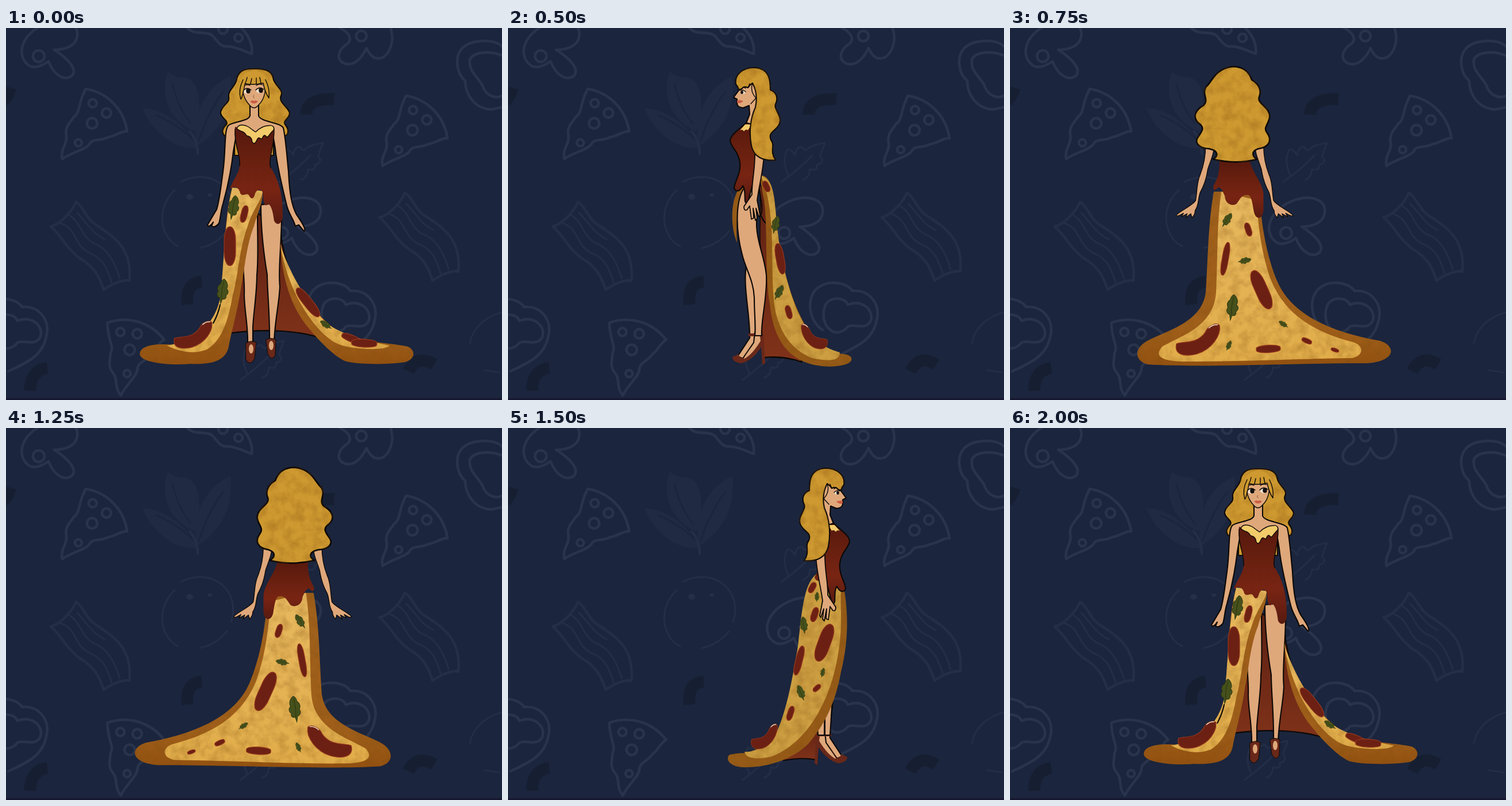
Recreate the animation shown at these times as an HTML page. Size 864 px wide and 648 px high, loop 2.25 s.

```html
<!DOCTYPE html>
<html lang="en">
<head>
<meta charset="utf-8">
<title>Pizza gown turn</title>
<style>
html, body { margin: 0; width: 100%; height: 100%; overflow: hidden; background: #1b253d; }
svg { display: block; width: 100vw; height: 100vh; }
.doodle { fill: none; stroke: #29344c; stroke-width: 4.6; stroke-linecap: round; stroke-linejoin: round; }
.thin { stroke-width: 3; }
.faint { opacity: .65; }
.olive { fill: none; stroke: #161f32; stroke-width: 21; }
.ink { stroke: #0b0806; stroke-width: 2.1; stroke-linejoin: round; stroke-linecap: round; }
.fine { stroke-width: 1.4; }
.line { fill: none; }
.hair { fill: #ce9930; }
.skin { fill: #dfa87b; }
.sauce { fill: url(#sauce); }
.lining { fill: url(#lining); }
.crust { fill: url(#crust); }
.cheese { fill: url(#cheese); }
.dim .cheese { fill: #cd9f42; }
.dim .crust { fill: #965b17; }
.top { fill: #f2cb6b; }
.pep { fill: #6c2013; stroke: #96381d; stroke-width: 1.2; }
.leaf { fill: #46501b; stroke: #2c3711; stroke-width: .8; }
.shoe { fill: #692819; }
.tx { filter: url(#grain); }
</style>
</head>
<body>
<svg viewBox="0 0 864 648" preserveAspectRatio="none">
  <defs>
    <linearGradient id="sauce" x2="0" y2="1">
      <stop offset="0" stop-color="#56180e"/><stop offset=".35" stop-color="#69200f"/><stop offset=".65" stop-color="#782413"/><stop offset="1" stop-color="#581a10"/>
    </linearGradient>
    <linearGradient id="lining" x2="0" y2="1">
      <stop offset="0" stop-color="#5c2013"/><stop offset="1" stop-color="#803219"/>
    </linearGradient>
    <linearGradient id="crust" x2="0" y2="1">
      <stop offset="0" stop-color="#a0611c"/><stop offset=".8" stop-color="#9f5f1a"/><stop offset="1" stop-color="#935110"/>
    </linearGradient>
    <linearGradient id="cheese" x2="0" y2="1">
      <stop offset="0" stop-color="#e8b960"/><stop offset="1" stop-color="#e1ad4a"/>
    </linearGradient>
    <filter id="grain" color-interpolation-filters="sRGB">
      <feTurbulence type="fractalNoise" baseFrequency=".06" numOctaves="4" seed="4"/>
      <feColorMatrix values="0 0 0 0 .5  0 0 0 0 .3  0 0 0 0 .06  .6 0 0 0 -.22"/>
      <feComposite in2="SourceGraphic" operator="in" result="n"/>
      <feMerge><feMergeNode in="SourceGraphic"/><feMergeNode in="n"/></feMerge>
    </filter>
  </defs>
  <rect width="864" height="648" fill="#1b253d"/>
  <g id="wall"></g>
  <rect y="645" width="864" height="3" fill="#171730"/>
  <g id="cast"></g>
</svg>
<script>
const path = (cls, d, extra = '') => `<path class="${cls}" d="${d}" ${extra}/>`;
const group = (t, ...parts) => `<g transform="${t}">${parts.join('')}</g>`;
const wrap = (cls, ...parts) => `<g class="${cls}">${parts.join('')}</g>`;
const tx = (...parts) => wrap('tx', ...parts);
const ring = (x, y, r) => `<circle class="doodle" cx="${x}" cy="${y}" r="${r}"/>`;
const dot = (x, y, rx, ry, fill) => `<ellipse cx="${x}" cy="${y}" rx="${rx}" ry="${ry}" fill="${fill}"/>`;
const pep = (x, y, rx, ry, a) =>
  `<rect class="pep" x="${-rx}" y="${-ry}" width="${2 * rx}" height="${2 * ry}" rx="${rx * .95}" ry="${ry * .7}" transform="translate(${x} ${y}) rotate(${a})"/>`;
const leaf = (x, y, s, a) => group(`translate(${x} ${y}) rotate(${a}) scale(${s * .8} ${s})`,
  path('leaf', 'M1-15C7-12 9-6 6-3C11-1 9 4 6 5C8 9 4 11 1 10L-1 16L-3 9C-8 8-9 3-6 1C-10-3-6-8-4-8Q-3-13 1-15Z'),
  path('line', 'M1-12Q-2 0 0 10', 'stroke="#2c3711"'));
const bean = (t = '') => group(t,
  path('pep', 'M290 550C300 545 325 552 340 530C345 518 360 512 365 518C368 535 352 560 325 568C305 573 285 570 290 550Z'),
  path('line', 'M346 523Q353 516 362 517', 'stroke="#e8d6ba" stroke-width="1.6"'));

/* ---------- wallpaper ---------- */
const shroom = path('doodle', 'M467 375C440 360 448 320 490 302C520 288 552 298 548 322C546 340 526 346 508 346C530 360 548 378 540 390C528 402 508 392 498 366C490 372 478 378 467 375') + ring(481, 357, 10);
const slice = path('doodle', 'M139 106C175 112 205 140 211 180C200 179 188 190 178 190C165 198 150 191 145 203C135 214 115 216 98 228C94 210 108 202 105 187C102 172 112 165 118 155C130 148 125 130 139 106Z') +
  ring(151, 131, 7) + ring(175, 148, 8) + ring(150, 166, 9) + ring(126, 200, 6);
const bacon = wrap('faint',
  path('doodle', 'M78 346C92 342 112 325 122 303C135 310 140 335 160 345C190 365 220 385 215 440C205 438 185 445 170 456C162 430 152 415 130 402C105 385 100 365 78 346Z'),
  path('doodle thin', 'M95 340C125 350 118 382 150 394C172 404 178 425 184 443M110 326C132 338 130 368 160 378C182 390 192 415 198 436M124 322C142 340 150 358 172 368'));
const pepper = path('doodle', 'M548 526C522 508 520 470 538 454C556 438 590 442 600 458C630 455 650 482 642 510C635 545 605 556 576 570') +
  path('doodle', 'M556 478C570 466 588 472 592 482C615 472 638 490 632 510C622 528 604 514 592 520C585 530 570 534 562 526C545 515 548 486 556 478Z');
const sprig = wrap('faint', path('doodle thin', 'M476 268Q505 248 530 222M488 256C478 236 482 222 486 212C494 210 498 218 500 222C502 210 506 207 512 207C516 212 518 214 520 212C530 203 544 202 552 200C548 212 544 218 544 225C552 230 544 238 538 238C540 248 532 248 526 246C526 258 518 264 514 264'));
const basil = wrap('faint',
  ...['M334 208C300 215 255 185 238 140C270 140 312 165 334 208Z', 'M334 205C320 170 340 105 391 84C396 130 380 175 334 205Z',
    'M328 180C280 160 268 110 282 76C300 92 310 80 324 92C340 110 340 150 328 180Z'].map(d => path('', d, 'fill="#242f47"')),
  path('doodle thin', 'M334 219Q334 195 318 178M262 152Q300 168 332 200M378 112Q350 150 336 196M290 98Q300 140 322 166', 'style="stroke:#1b253d"'),
  path('doodle', 'M334 219Q333 195 320 180'));

document.getElementById('wall').innerHTML = [
  shroom, group('translate(-424 -308)', shroom),
  path('doodle', 'M582 0C598 8 604 20 594 28C578 38 574 56 590 62C608 68 622 48 628 35C640 62 660 55 668 38C676 20 672 8 670 0'), ring(619, 14, 9),
  slice, group('translate(558 12)', slice), group('translate(200 640) rotate(-29) translate(-98 -228)', slice),
  path('doodle', 'M316 0C330 14 345 4 358 12C368 20 372 34 386 32C400 32 414 40 428 45C430 28 422 12 410 0'), ring(405, 17, 7), ring(378, 2, 8),
  bacon, group('translate(573 -16)', bacon),
  pepper, group('translate(-572 28)', pepper),
  path('doodle', 'M864 32C850 18 810 20 795 35C780 50 785 80 800 92C800 115 815 140 845 142L864 138M864 48C845 40 815 40 808 55C805 75 822 85 830 100C834 115 850 125 864 118'),
  wrap('faint', path('doodle thin', 'M294 282C255 320 275 370 300 380M304 268C360 240 410 285 392 338M385 354Q365 378 338 383'),
    dot(320, 294, 6, 5, '#2a354e'), dot(355, 291, 4, 3, '#2a354e'),
    path('doodle thin', 'M808 550Q815 510 864 495M834 596L860 600')),
  sprig, group('translate(-68 345)', sprig), basil,
  path('olive', 'M523 151Q524 122 572 124M341 442Q312 444 316 482M72 592Q42 596 42 632M701 598Q715 568 746 586M-5 128Q4 118 8 104')
].join('');

/* ---------- front views; turn shifts the facial features ---------- */
function front(turn) {
  const eye = (x, y) => dot(x, y, 6.2, 4.4, '#f4e6d4') + dot(x + 2 + turn / 4, y - .3, 3.8, 4.2, '#15100d') +
    path('ink line fine', `M${x - 7} ${y - 1}Q${x} ${y - 8} ${x + 7} ${y - 2}M${x - 6} ${y - 9}Q${x} ${y - 13} ${x + 5} ${y - 10}`);
  return [
    tx(path('ink hair', 'M432 71C455 71 464 76 466 90C470 102 484 108 479 118C474 130 492 138 494 148C494 158 482 160 486 168C493 176 492 184 488 187L466 190V222H398V190L380 187C374 180 380 172 384 168C388 160 372 156 374 146C378 132 390 132 388 120C386 108 402 100 402 88C406 74 415 71 432 71Z')),
    path('ink lining', 'M436 322L478 345C480 400 505 470 560 545C520 526 450 523 386 532L412 400Z'),
    path('skin ink', 'M438 318C438 370 440 400 437 430C437 460 432 490 430 520L430 550H421C422 520 415 490 415 465C416 440 412 420 413 395C414 370 424 340 438 318Z'),
    path('skin ink', 'M444 308C444 360 450 400 455 430C455 460 460 500 459 548H467C468 510 476 480 477 450C474 420 479 390 480 335L470 305Z'),
    path('shoe ink', 'M418 549Q427 543 436 548L433 576Q425 590 418 578Z', 'style="stroke-width:1"'), dot(427, 559, 4, 8, '#dfa87b'),
    path('shoe ink', 'M453 543Q462 538 470 543L469 570Q463 582 456 568Z', 'style="stroke-width:1"'), dot(462, 553, 4, 8, '#dfa87b'),
    tx(path('crust', 'M394 278L447 284C448 305 438 322 432 345C418 380 416 420 409 455C402 500 392 530 388 555C382 584 350 586 320 585C290 588 232 584 233 567C235 550 270 550 292 552C340 545 372 515 376 470C380 400 380 330 394 278Z'),
      path('cheese', 'M394 278L447 284C446 300 430 315 421 345C406 385 405 430 394 470C386 515 374 545 350 560C330 568 306 566 280 553C340 545 368 505 374 465C380 400 382 330 394 278Z'),
      path('crust', 'M478 375C490 430 540 510 590 535C620 548 670 548 700 555C715 562 712 578 695 582C660 587 610 586 590 580C570 570 545 545 525 520C500 490 480 440 478 375Z'),
      path('cheese', 'M478 377C490 420 530 490 560 515C585 535 640 548 668 553C665 562 605 561 580 551C540 535 490 460 478 377Z')),
    path('ink line', 'M373 482Q369 500 361 514'),
    pep(390, 380, 10, 34, 0), pep(415, 324, 5.5, 15, 14), bean('translate(41 62) scale(.87)'),
    pep(526, 478, 8, 31, -38), pep(602, 541, 18, 6, 22), pep(624, 549, 22, 7, 3),
    leaf(396, 312, 1.35, 8), leaf(377, 458, 1.4, 5), leaf(557, 517, .75, -60),
    path('skin ink', 'M425 132V153C422 163 394 163 387 170C380 178 383 215 378 250C374 280 372 300 367 316L351 343Q353 349 361 338L358 345Q364 349 371 340C374 330 374 318 378 306C384 285 392 250 396 215L400 192H466L469 210C472 240 482 280 488 305C492 325 500 330 504 345L510 343L519 354C524 352 515 338 506 325C498 310 494 290 492 250C489 220 487 190 483 174C478 164 444 164 440 153V132Z'),
    path('sauce', 'M399 172C397 205 409 220 407 240C405 256 394 266 390 281C398 272 407 280 408 288C413 295 418 286 423 291C427 300 432 298 434 288C438 280 446 279 448 290C448 310 454 312 456 306C462 308 465 320 467 336C472 345 480 342 482 330C483 290 474 262 461 243C456 230 468 205 467 172L435 183Z'),
    path('ink line fine', 'M399 176C397 205 409 220 407 240M467 176C468 205 456 230 461 243'),
    path('top ink fine', 'M402 175C405 167 415 168 422 172C428 176 432 180 435 181C440 176 448 170 458 170C466 168 468 175 466 178C460 182 458 190 454 190C450 184 448 188 446 193C442 193 440 188 437 195C434 203 429 203 428 194C424 186 420 190 418 186C414 178 408 182 402 175Z'),
    path('skin ink fine', 'M411 92C411 115 416 125 424 134Q432 144 440 134C449 126 453 112 452 92Z'),
    group(`translate(${turn} 0)`, eye(420, 110), eye(442, 109),
      path('line', 'M432 117Q429 121 433 122', 'stroke="#9a6440" stroke-width="1.2"'),
      path('', 'M425 128Q429 125 432 127Q436 125 439 128Q432 135 425 128Z', 'fill="#cb5b45"')),
    path('hair', 'M409 124C403 96 408 76 432 74C456 76 462 98 458 122C452 116 451 106 448 96Q432 99 417 98Q413 108 409 124Z'),
    path('ink line fine', 'M409 124Q404 108 413 90M410 123Q414 112 416 98Q419 92 420 86M417 97Q430 100 448 96M426 97L428 88M436 97V87M444 96L442 86M448 96Q451 112 458 122Q460 106 452 90')
  ].join('');
}

/* ---------- profile parts, facing left ---------- */
const feet = [
  path('skin ink', 'M415 415C409 450 422 500 421 540L400 572L410 576L431 545L430 440Z'),
  path('skin ink', 'M430 530L428 548L408 577L416 578L442 552V530Z'),
  path('shoe', 'M419 532H445L448 584L443 587L441 556Q425 580 406 584Q391 582 391 573L402 568Q402 575 410 575L424 552L410 577Q425 570 440 545L439 537H419Z')
].join('');
const thigh = path('skin ink', 'M412 278C396 300 396 350 408 395C414 420 428 440 429 470C429 500 432 520 430 536H442C440 510 452 470 450 430C446 395 434 375 433 345V285Z');
const bust = [
  path('skin ink', 'M404 98L401 110L393 121L399 124V130Q398 138 410 139L420 135L421 150L414 168L440 180L440 110L426 95Z'),
  path('sauce ink', 'M415 165C405 175 388 185 387 196C388 208 402 215 404 235C406 255 394 268 394 279C397 287 405 284 409 275C414 280 412 294 413 302Q416 309 419 300L424 280L440 225L432 170Z'),
  path('top', 'M413 168Q408 174 404 178Q409 176 411 180Q414 175 418 178L424 168Z'),
  path('skin ink', 'M430 215C431 245 424 270 425 290L411 311Q411 319 416 317L421 310L424 333L428 331L427 314L431 335L434 332L432 314L437 329L439 326L434 300C437 275 446 245 446 215Z', 'style="stroke-width:1.8"'),
  dot(409, 112, 4, 3, '#f4e6d4'), dot(407.5, 112, 2.4, 3, '#15100d'),
  path('ink line fine', 'M403 109Q408 106 414 111M404 105Q409 101 414 105'),
  path('', 'M399 126Q404 125 410 127Q404 133 399 130Z', 'fill="#cb5b45"'),
  tx(path('hair ink', 'M397 98C394 82 408 69 430 69C455 71 457 90 457 108C468 112 470 122 467 130C460 140 478 152 473 166C468 180 452 180 458 195C466 205 455 214 466 230C445 232 428 225 424 205C420 185 421 160 431 138Q436 115 426 96Q421 99 418 104Q414 102 410 103Q406 108 402 107Q401 103 397 98Z')),
  path('ink line fine', 'M426 96Q421 110 432 122L423 132M418 104L421 97')
].join('');

const sideLeft = wrap('dim',
  path('lining ink fine', 'M434 265C448 300 430 360 446 420C448 470 436 520 446 574Q480 572 512 582L470 500L455 300Z'),
  path('ink line', 'M446 574Q480 570 512 582M437 280Q446 320 440 325Q446 340 451 340'),
  tx(path('crust', 'M404 277C387 300 387 345 399 374C396 335 400 305 414 280Z'),
    path('crust', 'M438 256C460 256 464 290 468 340C474 400 490 470 518 518C535 552 560 566 585 568C603 570 602 582 588 586C570 591 555 590 540 588C490 580 462 545 456 480C446 420 454 330 444 290Z'),
    path('cheese', 'M440 257C462 262 464 290 468 340C474 400 490 470 515 515C535 550 560 560 578 565C578 582 555 580 530 575C490 560 464 520 462 460C458 400 466 310 440 257Z')),
  pep(450, 276, 5, 10, -25), pep(474, 402, 7, 27, -10), pep(489, 495, 5, 12, -15), bean('translate(730 103) scale(-.6 .8)'),
  leaf(466, 342, 1, 10), leaf(472, 460, .9, 25), feet, thigh, bust);

const sideRight = wrap('dim',
  path('lining', 'M540 510L538 578Q510 574 470 580L500 550Z'),
  path('ink line', 'M538 578Q510 573 480 579'),
  group('translate(982 0) scale(-1 1)', feet, path('skin ink', 'M415 440L421 535H431L430 450Z M430 450V535H442L448 450Z')),
  tx(path('crust', 'M540 255L586 284C592 320 594 370 580 425C570 480 552 515 525 548C500 575 455 592 410 591C385 590 378 576 386 569Q400 566 414 566C440 560 465 540 480 510C505 440 505 380 511 330Z'),
    path('cheese', 'M538 254C515 270 512 320 505 380C495 440 484 500 465 535C445 560 425 565 412 564C415 577 435 578 460 572C520 548 558 480 572 410C585 350 578 310 580 284L555 260Z')),
  path('sauce', 'M538 252L548 252L546 266Q536 268 534 260Z'),
  pep(530, 278, 5, 10, 30), pep(534, 325, 5.5, 13, 18), pep(551, 374, 11, 34, 20), pep(507, 405, 6, 26, 14),
  pep(538, 453, 4, 8, 48), pep(492, 497, 5, 13, 18), bean('translate(250 103) scale(.6 .8)'),
  leaf(538, 294, .55, 0), leaf(515, 343, .95, -10), leaf(548, 426, .55, 10), leaf(510, 461, .9, -25),
  group('translate(982 1) scale(-1 1)', bust));

/* ---------- back views ---------- */
const arm = path('skin ink fine', 'M430 212C430 240 424 260 418 275C413 290 414 305 411 322C405 332 385 340 374 351Q376 355 388 347L384 354L395 348L392 356L402 348L404 356Q410 350 410 342C418 330 415 318 420 305C428 290 432 275 434 260C440 240 446 230 446 212Z');
const arms = arm + group('translate(970 0) scale(-1 1)', arm);
const drip = path('sauce', 'M458 236H503C508 262 524 280 525 300V330C524 348 512 348 510 330C508 315 506 300 500 302C492 300 488 312 484 318C476 324 466 316 466 304C462 292 458 284 454 290C450 296 446 290 450 282C456 270 458 255 458 236Z');
const mane = tx(path('hair ink', 'M483 68C505 68 514 80 518 92C532 100 536 112 532 122C526 135 550 140 551 158C550 172 538 178 546 188C556 202 550 214 530 217C515 222 520 232 528 236Q490 246 447 236C458 230 456 220 440 217C420 216 412 205 420 195C428 184 432 178 420 170C408 158 416 146 430 138C440 128 426 118 434 105C446 95 450 72 483 68Z', 'style="stroke-width:2.8"'));

const backLeft = [
  tx(path('crust', 'M355 285C345 340 345 400 341 460C335 510 280 525 245 542C215 555 215 580 240 586C330 592 480 584 620 584C670 582 675 555 645 545C560 530 490 500 465 440C448 400 440 350 437 320L420 285Z'),
    path('cheese', 'M368 285C360 340 362 400 359 460C355 520 300 535 265 555C252 570 260 580 300 581C400 582 500 576 595 575C615 572 618 555 600 548C530 530 480 500 455 440C440 400 432 350 430 300Z')),
  pep(375, 402, 5.5, 29, 10), pep(438, 456, 11, 36, -24), pep(415, 351, 5, 12, -18), pep(450, 559, 21, 6.5, -3),
  pep(517, 545, 9, 4, 25), pep(566, 561, 7, 3, 20), bean(),
  leaf(378, 334, .9, 30), leaf(409, 405, .75, 75), leaf(387, 486, 1.45, 5), leaf(476, 516, .6, -60), leaf(381, 553, .6, 20),
  group('matrix(.918 0 0 .876 -54 18.6)', arms),
  group('matrix(1.14 0 0 .951 -157 3.8)', drip),
  group('matrix(.95 0 0 .96 -71 2)', mane)
].join('');

const back = [
  tx(path('crust', 'M450 285C440 340 430 400 405 445C380 500 310 525 270 545C235 555 230 580 255 592C330 598 400 591 480 591C560 591 640 598 690 594C725 590 728 565 700 552C640 525 580 500 555 440C540 400 530 340 525 320L510 285Z'),
    path('cheese', 'M462 285C445 340 438 410 415 460C395 510 340 530 315 548C305 560 310 574 335 574C400 578 560 580 650 573C668 570 670 555 650 547C600 530 565 500 550 450C535 400 528 350 524 320L490 285Z')),
  pep(453, 401, 5.5, 30, 10), pep(529, 450, 11, 36, -24), pep(503, 344, 5, 12, -18), pep(431, 464, 20, 7.5, -30),
  pep(501, 520, 27, 8.5, -35), pep(543, 554, 21, 6.5, -3), pep(584, 540, 9, 4, 25), pep(633, 557, 7, 3, 20),
  bean('translate(64 -4)'),
  leaf(458, 338, .9, 30), leaf(497, 395, .75, 75), leaf(470, 483, 1.45, 5), leaf(573, 513, .6, -60), leaf(461, 548, .6, 20),
  arms, drip, mane
].join('');

/* ---------- turntable ---------- */
const STEP = 250;
const poses = [
  front(0),
  group('matrix(.714 0 0 1.017 127.4 -3.2)', front(-5)),
  sideLeft,
  backLeft,
  back,
  group('matrix(-1.009 0 0 1.004 894 1)', backLeft),
  sideRight,
  group('matrix(.756 0 0 1.027 157.6 -4)', front(5)),
  front(0)
];
const cast = document.getElementById('cast');
cast.innerHTML = poses.map(p => `<g display="none">${p}</g>`).join('');

let shown = -1;
function draw(t) {
  const i = Math.floor(t / STEP) % poses.length;
  if (i === shown) return;
  [...cast.children].forEach((g, k) => g.setAttribute('display', k === i ? 'inline' : 'none'));
  shown = i;
}
const start = performance.now();
function tick() {
  draw(performance.now() - start);
  requestAnimationFrame(tick);
}
tick();
</script>
</body>
</html>
```
